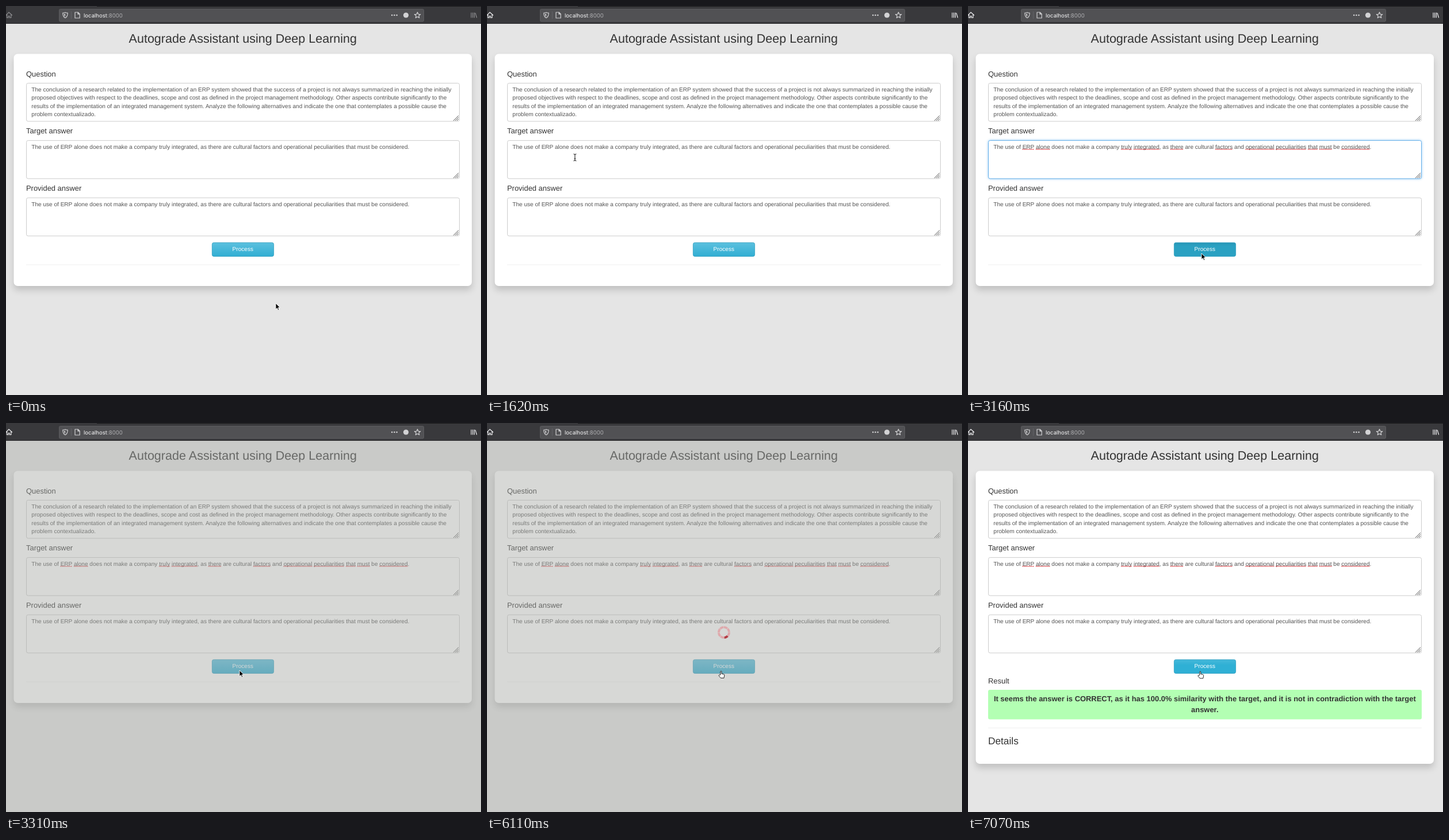
These frames come from a looping animation (826 px wide and 678 px high, 8 s). An HTML page:

```html
<!DOCTYPE html>
<html lang="en">
<head>
<meta charset="utf-8">
<title>Autograde Assistant</title>
<style>
  html, body { margin: 0; width: 100%; height: 100%; overflow: hidden; background: #e5e5e5; }
  svg { display: block; width: 100vw; height: 100vh; }
  text { font-family: "Liberation Sans", Arial, sans-serif; text-rendering: geometricPrecision; fill: #333; white-space: pre; }
  .mid { text-anchor: middle; }
  .label { font-size: 12.93px; }
  .body { font-size: 10.07px; fill: #555; }
  .url { font: 9.6px Inter, sans-serif; fill: #f9f9fa; }
  .icon { fill: none; stroke: #d2d2d4; stroke-width: 1.2; stroke-linejoin: round; stroke-linecap: round; }
  .field { fill: #fff; stroke: #ccc; }
  .focus { stroke: #66afe9; filter: drop-shadow(0 0 2px rgba(82,168,236,.6)); }
  #card { fill: #fff; filter: drop-shadow(0 7px 6px rgba(0,0,0,.16)); }
</style>
</head>
<body>
<svg viewBox="0 0 826 678">
  <defs>
    <linearGradient id="normal" x2="0" y2="1"><stop stop-color="#5bc0de"/><stop offset="1" stop-color="#31aed3"/></linearGradient>
    <linearGradient id="hover" x2="0" y2="1"><stop stop-color="#45b8da"/><stop offset=".4" stop-color="#2fb0d5"/></linearGradient>
    <linearGradient id="pressed" x2="0" y2="1"><stop stop-color="#2795b5"/><stop offset=".25" stop-color="#2aa1c2"/></linearGradient>
    <path id="grip" d="M-10 -1L-1 -10M-7 -1L-1 -7M-4 -1L-1 -4" stroke="#555"/>
  </defs>

  <text class="mid" x="411.8" y="63.5" font-size="21.55">Autograde Assistant using Deep Learning</text>
  <rect id="card" x="13.5" y="83.5" width="796.5" rx="7"/>
  <g id="fields"></g>
  <path id="spelling" stroke="#e0393e" stroke-width="1.4" stroke-dasharray="1.4 .9"/>
  <path id="caret" d="M143.7 240v11" stroke="#333" stroke-width=".9"/>
  <rect id="button" x="358.4" y="412.4" width="107.2" height="24" rx="3" stroke="#2d9dbe" stroke-width=".8"/>
  <text class="mid" x="411.8" y="427.2" font-size="10.07" style="fill:#fff">Process</text>
  <path id="rule" d="M35 0H789" stroke="#f0f0f0"/>
  <g id="result">
    <text class="label" x="35" y="454.4">Result</text>
    <rect x="35" y="465" width="754" height="51.5" rx="3" fill="#b3ffb3"/>
    <g class="mid" font-size="12.93" font-weight="bold">
      <text x="411.8" y="485.2">It seems the answer is CORRECT, as it has 100.0% similarity with the target, and it is not in contradiction with the target</text>
      <text x="411.8" y="503.6">answer.</text>
    </g>
    <text x="35" y="560" font-size="17.28">Details</text>
  </g>

  <rect id="veil" y="31" width="826" height="647" fill="#a6a8a5" opacity=".45"/>
  <g id="spinner" transform="translate(412 365)" fill="none" stroke-width="3.8">
    <circle r="9.1" pathLength="8" stroke="#dfa9ac" stroke-dasharray=".9 .1"/>
    <circle id="active" r="9.1" pathLength="8" stroke="#b23b42" stroke-dasharray=".9 7.1"/>
  </g>

  <g id="toolbar">
    <rect width="826" height="31" fill="#39393c"/>
    <path d="M158 .5H826" stroke="#18181a"/>
    <path d="M0 30.5H826" stroke="#252527"/>
    <rect x="92.5" y="5.5" width="634" height="21.5" rx="2" fill="#515154" stroke="#5d5d60"/>
    <g class="icon">
      <g id="outer">
        <path d="M0 16l5-5 5.5 5M1.6 15v5.5H4v-3h2.2v3h2.6V15"/>
        <path d="M809 11.5v9m2.7-9v9m2.7-9v9m1.6-8.5l2.6 8.5" stroke-linecap="butt"/>
      </g>
      <path d="M98.8 12.2q2.4 0 4.2-1 1.8 1 4.2 1 0 6.5-4.2 8.6-4.2-2.1-4.2-8.6Z"/>
      <path d="M103 13.4v5q-2-1.4-2.1-4.5Z" fill="#d2d2d4" stroke="none"/>
      <path d="M113.5 10v12" stroke="#69696c" stroke-width=".8"/>
      <path d="M120 11h5.2l3 3v7H120Zm5 0v3.2h3"/>
      <path d="M671.2 16h9" stroke-width="2.6" stroke-dasharray="0 4.2"/>
      <circle cx="695.5" cy="16" r="4.6" fill="#d2d2d4" stroke="none"/>
      <polygon id="star" transform="translate(715.5 16.3)"/>
    </g>
    <text class="url" x="135" y="19.6">localhost<tspan fill="#aeaeb1">:8000</tspan></text>
  </g>

  <g id="cursor" stroke-linejoin="round">
    <path id="arrow" d="M0 0v10.6l2.5-2.2 1.7 3.8 1.7-.8-1.6-3.7h3.2Z" stroke="#fff" stroke-width=".9"/>
    <path id="beam" d="M-2.4-6Q0-6 0-4.6 0-6 2.4-6M0-5V5M-2.4 6Q0 6 0 4.6 0 6 2.4 6M-1.3 2h2.6" fill="none" stroke="#111"/>
    <path id="hand" transform="translate(1 1)" d="M-1 7V1.5a1 1 0 0 1 2 0V5l4 1q1 .3.8 2L5 12.5H-.5l-3.3-4Q-4 7-2.6 7Z" fill="#fff" stroke="#111" stroke-width=".9"/>
  </g>
</svg>

<script>
const $ = id => document.getElementById(id);
const show = (id, on) => $(id).style.display = on ? "" : "none";

const LOOP = 8000, TICK = 118.8;
const at = { awake: 240, move: 910, focus: 1980, caretOff: 2560, press: 3160, veil: 3310, spin: 3460, spinTick: 3610, hand: 6110, done: 6230 };

const answer = ["The use of ERP alone does not make a company truly integrated, as there are cultural factors and operational peculiarities that must be considered."];
const fields = [
  ["Question", [
    "The conclusion of a research related to the implementation of an ERP system showed that the success of a project is not always summarized in reaching the initially",
    "proposed objectives with respect to the deadlines, scope and cost as defined in the project management methodology. Other aspects contribute significantly to the",
    "results of the implementation of an integrated management system. Analyze the following alternatives and indicate the one that contemplates a possible cause the",
    "problem contextualizado."]],
  ["Target answer", answer],
  ["Provided answer", answer]
];
const fieldTop = i => 134 + 99.9 * i;

$("fields").innerHTML = fields.map(([label, lines], i) => {
  const y = fieldTop(i);
  return `<text class="label" x="35" y="${y - 11.5}">${label}</text>
    <rect class="field" id="field${i}" x="35.5" y="${y + .5}" width="753" height="66.5" rx="3"/>
    <use href="#grip" x="788" y="${y + 67}"/>` +
    lines.map((s, n) => `<text class="body" id="line${i}${n}" x="44.3" y="${y + 14.8 + 14.4 * n}">${s}</text>`).join("");
}).join("");

// Mark the words the spell checker does not know
const unknown = /\b(ERP|alone|truly|integrated|there|factors|operational|peculiarities|that|must|considered)\b/g;
const line = $("line10");
$("spelling").setAttribute("d", [...answer[0].matchAll(unknown)].map(m => {
  const from = line.getStartPositionOfChar(m.index).x;
  const to = line.getEndPositionOfChar(m.index + m[0].length - 1).x;
  return `M${from} 249.8H${to}`;
}).join(""));

$("star").setAttribute("points", Array.from({ length: 10 }, (_, i) => {
  const r = i % 2 ? 2.5 : 5.5, a = i * Math.PI / 5;
  return [r * Math.sin(a), -r * Math.cos(a)];
}).join(" "));

// Pointer stops: [time, x, y]
const stops = [[0, 469, 518], [435, 456, 512], [790, 456, 512], [1383, 180, 158], [1620, 153, 264],
  [1980, 144, 259], [2450, 411, 445], [2920, 406, 431], [6830, 406, 431], [7070, 400.5, 432], [LOOP, 400.5, 432]];

function pointer(t) {
  const i = Math.max(1, stops.findIndex(s => s[0] >= t));
  const [t0, x0, y0] = stops[i - 1], [t1, x1, y1] = stops[i];
  const k = Math.max(0, (t - t0) / (t1 - t0));
  return [x0 + (x1 - x0) * k, y0 + (y1 - y0) * k];
}

// The screen refreshes in steps of one tick
const hold = (t, from) => from + Math.floor((t - from) / TICK + .02) * TICK;

function draw(t) {
  const busy = t >= at.veil && t < at.done, done = t >= at.done, focused = t >= at.focus;
  const [x, y] = pointer(hold(t, at.move));

  const inField = fields.some((_, i) => y > fieldTop(i) && y < fieldTop(i) + 67) && x > 35 && x < 789;
  const shape = t >= at.hand ? "hand" : inField ? "beam" : "arrow";
  for (const id of ["arrow", "beam", "hand"]) show(id, id === shape);
  $("cursor").setAttribute("transform", `translate(${x} ${y})`);

  $("outer").style.stroke = t < at.awake ? "#8d8d90" : "#f0f0f2";
  $("field1").classList.toggle("focus", focused && t < at.veil);
  show("spelling", focused);
  show("caret", focused && t < at.caretOff);

  const over = y > 412 && y < 437 && x > 358 && x < 466;
  const state = busy || !over ? "normal" : t >= at.press && !done ? "pressed" : "hover";
  $("button").setAttribute("fill", `url(#${state})`);

  show("result", done);
  $("card").setAttribute("height", done ? 510.5 : 404.5);
  $("rule").setAttribute("transform", `translate(0 ${done ? 531.5 : 451})`);
  show("veil", busy);
  show("spinner", busy && t >= at.spin);
  const segment = Math.floor((hold(t, at.spinTick) - 20) / 100) + 5;
  $("active").setAttribute("transform", `rotate(${segment % 8 * 45})`);
}

const start = performance.now();
(function loop() {
  draw((performance.now() - start) % LOOP);
  requestAnimationFrame(loop);
})();
</script>
</body>
</html>
```
